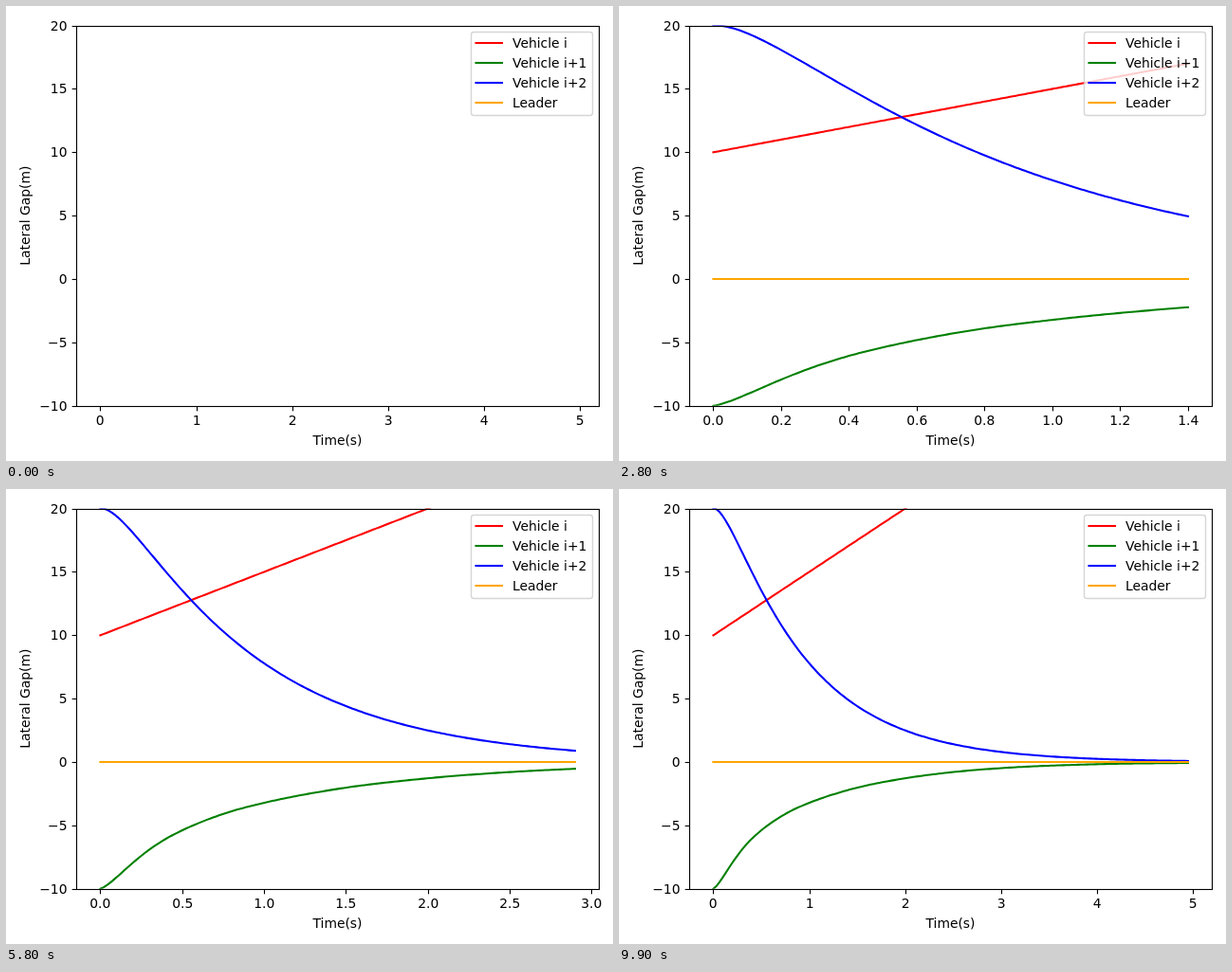
Animation, 640 px wide and 480 px high, one loop 10 s. Source, as an HTML page:

```html
<!DOCTYPE html>
<html lang="en">
<head>
<meta charset="utf-8">
<title>Lateral gap over time</title>
<style>
  html, body { margin: 0; width: 100%; height: 100%; overflow: hidden; background: #fff; }
  svg { display: block; width: 640px; height: 480px; }
  text { font: 13.889px "DejaVu Sans", sans-serif; fill: #000; }
  .axis { stroke: #000; stroke-width: 1.11; fill: none; }
  .curve { stroke-width: 2.083; fill: none; stroke-linecap: square; stroke-linejoin: round; }
</style>
</head>
<body>
<svg id="chart" viewBox="0 0 640 480">
  <clipPath id="area"><rect x="74.4" y="20.6" width="550.6" height="401.2"/></clipPath>
  <g id="curves" clip-path="url(#area)"></g>
  <g id="xTicks"></g>
  <g id="yTicks"></g>
  <rect class="axis" x="74.5" y="21.5" width="551" height="401"/>
  <text x="349.5" y="463" text-anchor="middle">Time(s)</text>
  <text transform="translate(25 221.2) rotate(-90)" text-anchor="middle">Lateral Gap(m)</text>
  <g id="legend">
    <rect x="490.5" y="27.5" width="128" height="88" rx="2.8" fill="#fff" stroke="#ccc"
          stroke-width="1.39" opacity="0.8"/>
  </g>
</svg>
<script>
const FRAME_MS = 100, FRAMES = 100, DT = 0.05;
const BOX = { left: 74.4, right: 625, top: 20.6, bottom: 421.8 };
const MARGIN = (BOX.right - BOX.left) / 22;
const X0 = BOX.left + MARGIN, X_SPAN = BOX.right - BOX.left - 2 * MARGIN;
const STEPS = [0.01, 0.02, 0.025, 0.05, 0.1, 0.2, 0.25, 0.5, 1];

const byId = id => document.getElementById(id);
const yPos = v => BOX.top + (20 - v) / 30 * (BOX.bottom - BOX.top);
const snap = v => Math.round(v) + 0.5;

function add(parent, tag, attrs, content) {
  const el = document.createElementNS("http://www.w3.org/2000/svg", tag);
  for (const name in attrs) el.setAttribute(name, attrs[name]);
  if (content !== undefined) el.textContent = content;
  parent.appendChild(el);
  return el;
}

// Smooth cubic through unevenly spaced points
function spline(points, startSlope) {
  const secant = i => (points[i + 1][1] - points[i][1]) / (points[i + 1][0] - points[i][0]);
  const last = points.length - 1;
  const slopes = points.map(([t], i) => {
    if (i === 0) return startSlope;
    if (i === last) return secant(last - 1);
    const before = t - points[i - 1][0], after = points[i + 1][0] - t;
    return (secant(i - 1) * after + secant(i) * before) / (before + after);
  });
  return t => {
    let i = 0;
    while (i < last - 1 && t > points[i + 1][0]) i++;
    const [t0, a] = points[i], [t1, b] = points[i + 1];
    const h = t1 - t0, u = (t - t0) / h, w = 1 - u;
    return a * w * w * (1 + 2 * u) + b * u * u * (3 - 2 * u)
      + h * u * w * (slopes[i] * w - slopes[i + 1] * u);
  };
}

const series = [
  { name: "Vehicle i", color: "#f00", value: t => 10 + 5 * t },
  { name: "Vehicle i+1", color: "#008000", value: spline([
    [0, -10], [0.05, -9.62], [0.1, -9.08], [0.2, -7.93], [0.3, -6.9], [0.4, -6.06],
    [0.5, -5.39], [0.65, -4.56], [0.8, -3.89], [1, -3.22], [1.4, -2.22], [2, -1.28],
    [2.5, -0.79], [3, -0.48], [4, -0.17], [5, -0.06]], 4) },
  { name: "Vehicle i+2", color: "#00f", value: t =>
    24.42 * Math.exp(-1.14 * t) - 4.1 * Math.exp(-5.5 * t) - 0.32 * Math.exp(-22 * t) },
  { name: "Leader", color: "#ffa500", value: () => 0 }
];

series.forEach((s, i) => {
  const y = 39 + 21 * i;
  s.path = add(byId("curves"), "path", { class: "curve", stroke: s.color });
  add(byId("legend"), "path", { class: "curve", stroke: s.color, d: `M495.5 ${y}H523` });
  add(byId("legend"), "text", { x: 534, y: y + 5 }, s.name);
});

for (let v = -10; v <= 20; v += 5) {
  const y = snap(yPos(v));
  add(byId("yTicks"), "path", { class: "axis", d: `M74.5 ${y}h-4.86` });
  add(byId("yTicks"), "text", { x: 64.5, y: y + 4.5, "text-anchor": "end" },
    String(v).replace("-", "\u2212"));
}

function drawTimeAxis(end) {
  const step = STEPS.find(s => s >= end * 1.1 / 9);
  const digits = (String(step).split(".")[1] || "").length;
  const group = byId("xTicks");
  group.replaceChildren();
  for (let i = 0; i * step <= end * 1.05; i++) {
    const x = snap(X0 + i * step / end * X_SPAN);
    add(group, "path", { class: "axis", d: `M${x} 422.5v4.86` });
    add(group, "text", { x: x - 0.3, y: 442, "text-anchor": "middle" }, (i * step).toFixed(digits));
  }
}

function curvePath(value, end) {
  const count = 160;
  let d = "";
  for (let i = 0; i <= count; i++) {
    const x = X0 + i / count * X_SPAN, y = yPos(value(i / count * end));
    d += (i ? "L" : "M") + x.toFixed(2) + " " + y.toFixed(2);
  }
  return d;
}

function draw(frame) {
  // The opening frame is empty and keeps the full time range
  const end = (frame || FRAMES - 1) * DT;
  drawTimeAxis(end);
  for (const s of series) s.path.setAttribute("d", frame ? curvePath(s.value, end) : "");
}

let start, shown = 0;
function tick(now) {
  start ??= now;
  const frame = Math.floor((now - start) / FRAME_MS) % FRAMES;
  if (frame !== shown) draw(shown = frame);
  requestAnimationFrame(tick);
}
draw(0);
requestAnimationFrame(tick);
</script>
</body>
</html>
```
